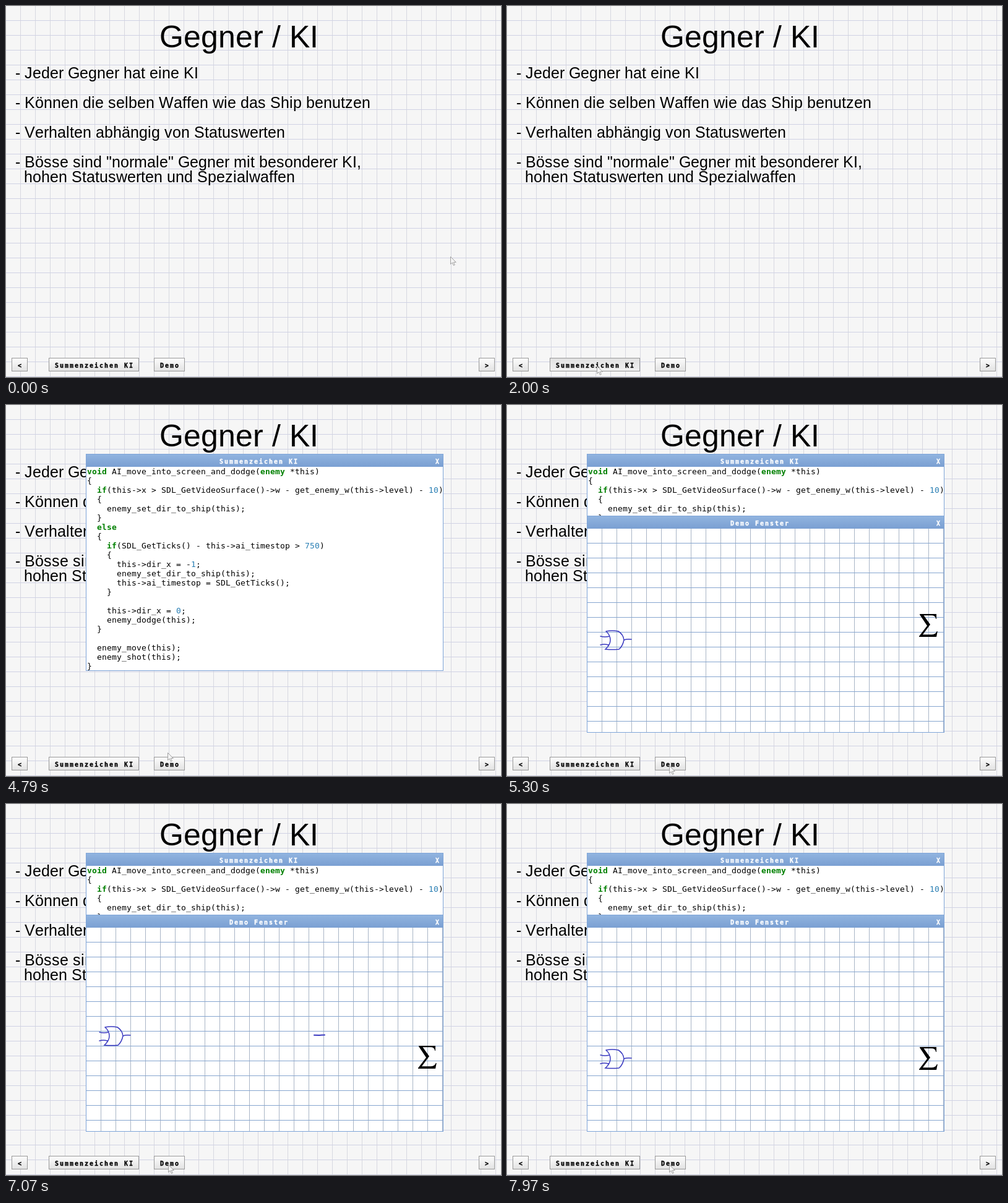
Animation, 800 px wide and 600 px high, one loop 8000 ms. Source, as an HTML page:

```html
<!DOCTYPE html>
<html lang="de">
<head>
<meta charset="utf-8">
<title>Gegner / KI</title>
<style>
html, body { margin: 0; width: 100%; height: 100%; overflow: hidden; background: #f6f6f6; }
svg { display: block; width: 800px; height: 600px; }
text { white-space: pre; }
.sans { font-family: "Liberation Sans", Arial, sans-serif; }
.title { font-size: 50px; }
.body { font-size: 25px; }
.ui { font: bold 10px "DejaVu Sans Mono", monospace; stroke: currentColor; stroke-width: .3px; }
.bar { fill: #fff; color: #fff; }
.code { font: 13px "DejaVu Sans Mono", monospace; }
.kw { font-weight: bold; fill: #008000; }
.num { fill: #2a7fb4; }
.frame { fill: none; stroke: #7fa5d8; }
.btn rect { fill: url(#up); stroke: #999; }
.btn.down rect { fill: url(#down); }
.ink { fill: none; stroke: #3a3ac0; stroke-width: 1.5; stroke-linecap: round; }
</style>
</head>
<body>
<svg viewBox="0 0 800 600" xmlns="http://www.w3.org/2000/svg">
  <defs>
    <pattern id="paper" width="24" height="24" patternUnits="userSpaceOnUse">
      <path d="M23 0h1v24h-1z" fill="#d7d8e0"/>
      <path d="M0 23h24v1h-24z" fill="#d0d2e4"/>
    </pattern>
    <pattern id="mesh" x="130" y="200" width="24" height="24" patternUnits="userSpaceOnUse">
      <path d="M23 0h1v24h-1z" fill="#a9b5c6"/>
      <path d="M0 23h24v1h-24z" fill="#87a6d0"/>
    </pattern>
    <linearGradient id="up" x2="0" y2="1"><stop stop-color="#fdfdfd"/><stop offset="1" stop-color="#e2e2e2"/></linearGradient>
    <linearGradient id="down" x2="0" y2="1"><stop stop-color="#e2e2e2"/><stop offset="1" stop-color="#f0f0f0"/></linearGradient>
    <linearGradient id="cap" x2="0" y2="1"><stop stop-color="#92b5e0"/><stop offset="1" stop-color="#7a9fd2"/></linearGradient>
    <clipPath id="view"><path d="M130 200h576v329H130z"/></clipPath>
  </defs>
  <rect width="800" height="600" fill="#f6f6f6"/>
  <rect width="800" height="600" fill="url(#paper)"/>
  <g id="slide"></g>
  <g id="codeWin"></g>
  <g id="demoWin">
    <g id="demoFrame"></g>
    <g clip-path="url(#view)">
      <rect x="130" y="200" width="576" height="329" fill="url(#mesh)"/>
      <path id="shot" class="ink" d="M1 1.7L9 1.9 18 1.4" stroke-width="2" style="stroke-width:2"/>
      <path id="gate" class="ink" d="M10 2Q17 8 17 16T9 31Q20 32 31 31Q37 26 39 16Q38 7 30 2Q20 0 10 2M1 10Q8 12 16 10M1 24Q7 22 14 24M39 16Q44 14 51 15"/>
      <path id="sigma" d="M1 0H28V8H27.2Q26.500 2.300 20 2.300H7.500L18 17 6 33.300H21Q27 33 28.600 28H29.800L28 37H0V36L13 19 1 1Z"/>
    </g>
  </g>
  <path id="mouse" d="M.5.5V12.500L3.300 10 5.300 14.500 7.300 13.700 5.300 9.400H9.300Z" fill="#f4f4f4" stroke="#999" stroke-width=".9"/>
</svg>
<script>
const $ = id => document.getElementById(id);
const pen = document.createElement('canvas').getContext('2d');

function add(parent, tag, attrs, content) {
  const el = document.createElementNS('http://www.w3.org/2000/svg', tag);
  for (const k in attrs) el.setAttribute(k, attrs[k]);
  if (content) el.textContent = content;
  return parent.appendChild(el);
}

// Glyphs sit on whole pixels, each advance rounded on its own.
function put(parent, str, x, y, cls, advance) {
  const xs = [];
  for (const ch of str) { xs.push(x); x += advance(ch); }
  add(parent, 'text', { x: xs.join(' '), y, class: cls }, str);
  return x;
}
const cell = () => 8;
const sans = size => ch => {
  pen.font = '1000px "Liberation Sans", Arial, sans-serif';
  return Math.round(pen.measureText(ch).width * size / 1000);
};

put($('slide'), 'Gegner / KI', 248, 67, 'sans title', sans(50));
[['- Jeder Gegner hat eine KI', 117],
 ['- Können die selben Waffen wie das Ship benutzen', 165],
 ['- Verhalten abhängig von Statuswerten', 213],
 ['- Bösse sind "normale" Gegner mit besonderer KI,', 261],
 ['  hohen Statuswerten und Spezialwaffen', 285]
].forEach(([s, y]) => put($('slide'), s, 15, y, 'sans body', sans(25)));

function button(label, x, width) {
  const g = add($('slide'), 'g', { class: 'btn' });
  add(g, 'rect', { x: x + .5, y: 569.5, width: width - 1, height: 21 });
  put(g, label, x + Math.round((width - label.length * 8) / 2) + 1, 585, 'ui', cell);
  return g;
}
button('<', 9, 26);
const codeBtn = button('Summenzeichen KI', 69, 146);
const demoBtn = button('Demo', 239, 50);
button('>', 764, 26);

function frame(g, label, x, y) {
  add(g, 'rect', { x: 129, y, width: 578, height: 351, fill: '#fff' });
  add(g, 'rect', { x: 129, y, width: 578, height: 21, fill: 'url(#cap)' });
  add(g, 'rect', { x: 129.5, y: y + .5, width: 577, height: 350, class: 'frame' });
  put(g, label, x, y + 16, 'ui bar', cell);
  put(g, 'X', 694, y + 16, 'ui bar', cell);
}
frame($('codeWin'), 'Summenzeichen KI', 345, 79);
frame($('demoFrame'), 'Demo Fenster', 361, 179);

const code = `void AI_move_into_screen_and_dodge(enemy *this)
{
  if(this->x > SDL_GetVideoSurface()->w - get_enemy_w(this->level) - 10)
  {
    enemy_set_dir_to_ship(this);
  }
  else
  {
    if(SDL_GetTicks() - this->ai_timestop > 750)
    {
      this->dir_x = -1;
      enemy_set_dir_to_ship(this);
      this->ai_timestop = SDL_GetTicks();
    }

    this->dir_x = 0;
    enemy_dodge(this);
  }

  enemy_move(this);
  enemy_shot(this);
}`;
code.split('\n').forEach((line, i) => {
  let x = 131;
  for (const part of line.split(/(\b(?:void|enemy|if|else|\d+)\b)/)) {
    if (!part) continue;
    const kind = /^\d+$/.test(part) ? ' num' : /^(void|enemy|if|else)$/.test(part) ? ' kw' : '';
    x = put($('codeWin'), part, x, 112 + 15 * i, 'code' + kind, cell);
  }
});

// Keys are [time, value...]; smooth paths use Hermite tangents.
function at(keys, t, smooth) {
  const last = keys.length - 1;
  if (t <= keys[0][0]) return keys[0].slice(1);
  if (t >= keys[last][0]) return keys[last].slice(1);
  let i = 0;
  while (t >= keys[i + 1][0]) i++;
  const a = keys[i], b = keys[i + 1], d = b[0] - a[0], u = (t - a[0]) / d;
  const slope = (n, k) => n < 1 || n >= last ? 0 :
    (keys[n + 1][k] - keys[n - 1][k]) / (keys[n + 1][0] - keys[n - 1][0]);
  return a.slice(1).map((p, j) => {
    const k = j + 1, q = b[k];
    if (!smooth) return p + (q - p) * u;
    const e = u * u * (3 - 2 * u);
    return p + (q - p) * e + d * u * (1 - u) * (slope(i, k) * (1 - u) - slope(i + 1, k) * u);
  });
}

const hops = [
  [[470, 718, 405], [620, 690, 402], [920, 535, 423], [1280, 342, 485], [1580, 213, 550], [1940, 145, 582]],
  [[2990, 145, 582], [3200, 128, 545], [3380, 116, 515]],
  [[3770, 116, 515], [4010, 140, 495], [4190, 179, 491], [4400, 224, 514], [4580, 254, 542], [4790, 261, 562], [5030, 262, 583]]
];
const gateY = [[6050, 364], [6230, 361], [6350, 359], [7070, 359], [7460, 417], [7550, 417], [7970, 396]];
const dodge = [[6560, 343], [7070, 391], [7280, 391], [7970, 393]];

const move = (id, x, y) => $(id).setAttribute('transform', `translate(${Math.round(x)} ${Math.round(y)})`);
const show = (id, on) => $(id).setAttribute('visibility', on ? 'inherit' : 'hidden');

function draw(ms) {
  const t = Math.floor((ms + 10) / 30) * 30 - 10;
  const hop = hops[t < 2990 ? 0 : t < 3770 ? 1 : 2];
  move('mouse', ...at(hop, t, true));
  codeBtn.classList.toggle('down', t >= 1970 && t < 2180);
  demoBtn.classList.toggle('down', t >= 5120 && t < 5300);
  show('codeWin', t >= 2030);
  show('demoWin', t >= 5210);

  const drift = 338 + Math.max(0, Math.min(5, Math.floor((t - 5195) / 210)));
  move('sigma', 666, t < 6590 ? drift : at(dodge, t)[0]);
  move('gate', 150, at(gateY, t)[0]);
  show('shot', t >= 6590 && t < 7430);
  move('shot', 497 + (t - 7070) * .6, 372);
}

const start = performance.now();
function loop() {
  draw((performance.now() - start) % 8000);
  requestAnimationFrame(loop);
}
draw(0);
requestAnimationFrame(loop);
</script>
</body>
</html>
```
